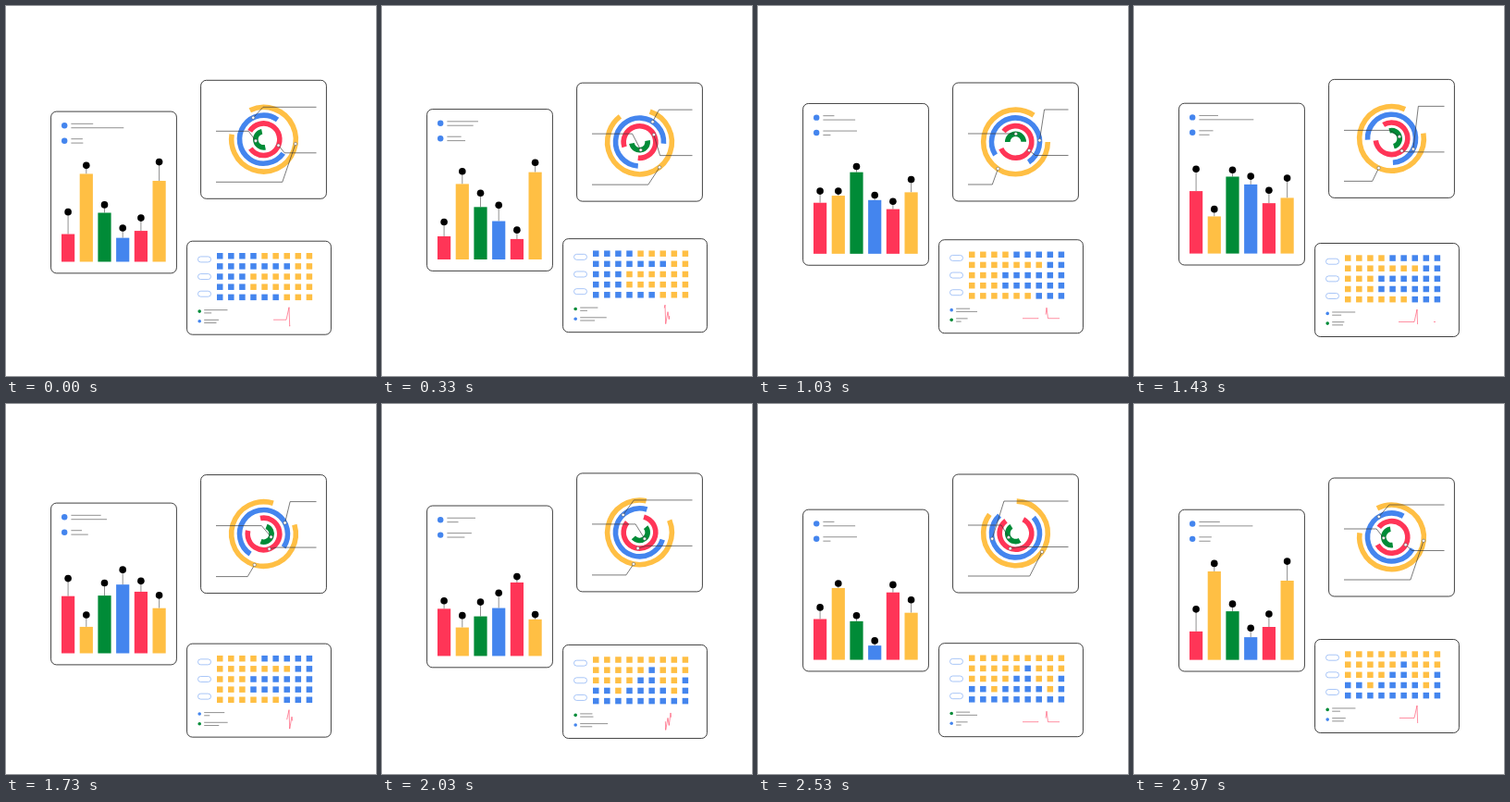
Recreate the animation shown at these times as an HTML page with a canvas. Size 400x400 px, loop 3 s.

```html
<!DOCTYPE html>
<html lang="en">
<head>
<meta charset="utf-8">
<title>Floating dashboards</title>
<style>
  html, body { margin: 0; width: 100%; height: 100%; overflow: hidden; background: #fff; }
  canvas { display: block; width: 400px; height: 400px; }
</style>
</head>
<body>
<canvas id="stage"></canvas>
<script>
const LOOP = 3000, HALF = 1500;
const YELLOW = '#ffbf44', BLUE = '#4485ee', RED = '#ff3557', GREEN = '#008b37';
const LINE = '#555';

const canvas = document.getElementById('stage');
const scale = window.devicePixelRatio || 1;
canvas.width = canvas.height = 400 * scale;
const ctx = canvas.getContext('2d');

// Cosine wave with its crest at the given time.
const wave = (mid, swing, crest, period = HALF) =>
  t => mid + swing * Math.cos(2 * Math.PI * (t - crest) / period);

// Eases in and out between [time, value] turning points, around the loop.
const glide = (...keys) => t => {
  const i = keys.findIndex(key => key[0] > t);
  const [t0, a] = keys.at(i < 0 ? -1 : i - 1);
  const [t1, b] = keys[Math.max(i, 0)];
  const u = ((t - t0 + LOOP) % LOOP) / ((t1 - t0 + LOOP) % LOOP);
  return a + (b - a) * (1 - Math.cos(Math.PI * u)) / 2;
};

const BARS = [
  { color: RED, height: glide([330, 25], [1430, 67.5], [2280, 47]), gap: wave(15, 9, -30) },
  { color: YELLOW, height: glide([600, 75], [1880, 27], [2880, 96.5]), gap: wave(9.2, 4.6, 380) },
  { color: GREEN, height: glide([150, 54], [1180, 90], [2240, 38]), gap: wave(10.3, 5.5, 450) },
  { color: BLUE, height: glide([700, 50], [1600, 77], [2580, 15]), gap: wave(11, 6.4, 390) },
  { color: RED, height: glide([300, 22], [1250, 52], [2250, 83]), gap: wave(9.5, 4.5, -30) },
  { color: YELLOW, height: glide([250, 95], [1100, 66], [2200, 38]), gap: wave(13, 8.5, -120) }
];

// pin is the marker's angle along the ring; side and y place its callout.
const RINGS = [
  { color: YELLOW, r: 34.8, sweep: 304, pin: 123, side: -1, y: 110,
    turn: glide([900, 361], [1900, 342], [2900, 242]) },
  { color: BLUE, r: 26, sweep: 270, pin: 209, side: 1, y: 29,
    turn: glide([580, 110], [1420, 177], [2380, -48]) },
  { color: RED, r: 17.3, sweep: 294, pin: 171, side: 1, y: 78.5,
    turn: glide([400, 160], [1300, 237], [2420, 303]) },
  { color: GREEN, r: 8.7, sweep: 180, pin: 92, side: -1, y: 55,
    turn: glide([1000, -181], [1700, -70], [2860, 88]) }
];

const BIG_LEGEND = [wave(93, 11, 350), wave(104.5, 25, 1400), wave(95.3, 14.5, 880), wave(84, 6.3, 400)];
const SMALL_LEGEND = [wave(232, 7.5, 0), wave(229, 9, 920), wave(234, 10.5, 470), wave(225, 5.3, 260)];

const ROW_SPLIT = [4, 7, 3, 3, 6];
const COLUMN_FILL = [2, 2, 1, 2, 3, 4, 2, 1, 3];
const PULSE = [[286, 85], [303, 85], [306, 71.5], [306.7, 92], [309, 79],
  [310.3, 87], [312, 73.5], [313.5, 85], [326, 85]];
const PULSE_LENGTH = PULSE.slice(1).reduce((sum, p, i) =>
  sum + Math.hypot(p[0] - PULSE[i][0], p[1] - PULSE[i][1]), 0);

function stroke(points, color = LINE, width = 0.65) {
  ctx.beginPath();
  points.forEach(p => ctx.lineTo(p[0], p[1]));
  ctx.strokeStyle = color;
  ctx.lineWidth = width;
  ctx.stroke();
}

function dot(x, y, r, color) {
  ctx.beginPath();
  ctx.arc(x, y, r, 0, 2 * Math.PI);
  ctx.fillStyle = color;
  ctx.fill();
}

function roundBox(x, y, w, h, r, color, width) {
  ctx.beginPath();
  ctx.roundRect(x, y, w, h, r);
  ctx.fillStyle = '#fff';
  ctx.fill();
  ctx.strokeStyle = color;
  ctx.lineWidth = width;
  ctx.stroke();
}

// Two marked entries of two lines each.
function legend(t, x, ends, y, step, spacing, r, colors) {
  colors.forEach((color, i) => dot(x, y + step * i, r, color));
  ends.forEach((end, i) => {
    const lineY = y + step * (i >> 1) + spacing * (i % 2 - 0.45);
    stroke([[x + r + 4 - (r < 2 ? 0.8 : 0), lineY], [end(t), lineY]]);
  });
}

function drawBars(t) {
  const base = 162.4;
  legend(t, 63.2, BIG_LEGEND, 15.2, 16.4, 4.4, 3.2, [BLUE, BLUE]);
  BARS.forEach((bar, i) => {
    const x = 67.1 + 19.7 * i, h = bar.height(t), top = base - h, pinY = top - bar.gap(t);
    stroke([[x, top], [x, pinY]]);
    ctx.fillStyle = bar.color;
    ctx.fillRect(x - 7.1, top, 14.2, h);
    dot(x, pinY, 3.8, '#000');
  });
}

function drawRings(t) {
  const cx = 278.5, cy = 63.9, rad = Math.PI / 180;
  RINGS.forEach(ring => {
    const start = ring.turn(t);
    ctx.beginPath();
    ctx.arc(cx, cy, ring.r, start * rad, (start + ring.sweep) * rad);
    ctx.strokeStyle = ring.color;
    ctx.lineWidth = 5.6;
    ctx.stroke();
  });
  RINGS.forEach(ring => {
    const a = (ring.turn(t) + ring.pin) * rad;
    const dx = ring.r * Math.cos(a), x = cx + dx, y = cy + ring.r * Math.sin(a);
    const far = ring.side > 0 ? 335.5 : 227;
    const elbow = cx + 0.85 * dx + 9 * ring.side;
    stroke([[far, ring.y], [elbow, ring.y], [x, y]], '#333');
    dot(x, y, 1.7, '#fff');
    ctx.strokeStyle = LINE;
    ctx.lineWidth = 0.5;
    ctx.stroke();
  });
}

function cellColor(phase, row, col) {
  if (phase === 2) return 5 - row <= COLUMN_FILL[col] ? BLUE : YELLOW;
  return (col < ROW_SPLIT[row]) === (phase === 0) ? BLUE : YELLOW;
}

function drawGrid(t) {
  const phase = Math.floor(t / 1000);
  for (let row = 0; row < 5; row++) {
    for (let col = 0; col < 9; col++) {
      ctx.fillStyle = cellColor(phase, row, col);
      ctx.fillRect(228 + 12.08 * col, 12.8 + 11.15 * row, 6.5, 6.5);
    }
  }
  for (let i = 0; i < 3; i++) roundBox(207.5, 16.7 + 18.65 * i, 14, 6, 3, '#85aef4', 0.7);

  const colors = phase === 1 ? [BLUE, GREEN] : [GREEN, BLUE];
  legend(t, 209.2, SMALL_LEGEND, 75.9, 10.7, 3.2, 1.8, colors);

  const run = 49;
  ctx.setLineDash([run, PULSE_LENGTH - run]);
  ctx.lineDashOffset = -(3 + PULSE_LENGTH * (t % HALF) / HALF);
  stroke(PULSE, RED, 0.55);
  ctx.setLineDash([]);
}

// Each card bobs up and down and draws from its own top edge.
const CARDS = [
  { x: 48.6, w: 135.8, h: 174.8, top: wave(109.8, 4.9, 2760, LOOP), draw: drawBars },
  { x: 210.6, w: 135.8, h: 128, top: wave(79.5, 4.8, 670, LOOP), draw: drawRings },
  { x: 195.6, w: 155.8, h: 101, top: wave(255.7, 4.8, 2100, LOOP), draw: drawGrid }
];

function render(t) {
  ctx.setTransform(scale, 0, 0, scale, 0, 0);
  ctx.fillStyle = '#fff';
  ctx.fillRect(0, 0, 400, 400);
  CARDS.forEach(card => {
    ctx.save();
    ctx.translate(0, card.top(t));
    roundBox(card.x, 0, card.w, card.h, 6, '#000', 0.75);
    card.draw(t);
    ctx.restore();
  });
}

const begin = performance.now();
function tick() {
  render((performance.now() - begin) % LOOP);
  requestAnimationFrame(tick);
}
tick();
</script>
</body>
</html>
```
